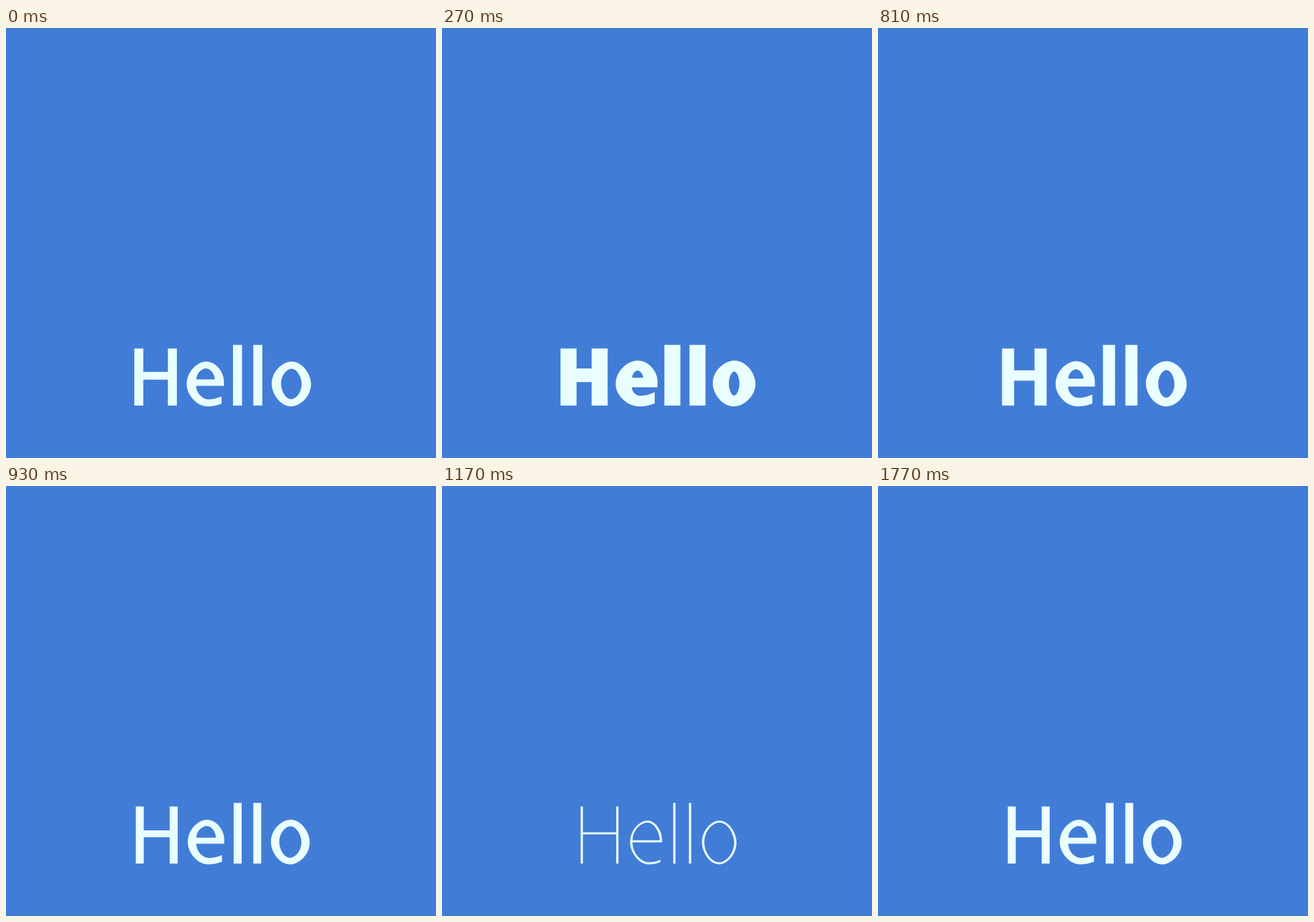
Write an HTML page that moves like this. It is 748x748 px and loops after 1.8 s.

```html
<!DOCTYPE html>
<html lang="en">
<head>
<meta charset="utf-8">
<title>Hello</title>
<style>
  html, body { margin: 0; width: 100%; height: 100%; overflow: hidden; background: #417dd7; }
  svg { display: block; width: 100%; height: 100%; }
  path { fill: #e9ffff; fill-rule: evenodd; }
</style>
</head>
<body>
<svg viewBox="0 0 748 748" role="img" aria-label="Hello"><path id="word"/></svg>
<script>
const LOOP = 1800, TICK = 30, MORPH = 540, HEAVY_AT = 270, THIN_AT = 1170;
const CAP = 557.6, ASCENDER = 551.2, BASE = 656.8, BOTTOM = 658.2;
const MIDDLE = 0.432; // weight of the middle master
const ROUND = 0.6;    // handle length of a quarter curve

// Each value has three masters: thin, middle, heavy
const masters = {
  H: { left: [241.2, 225.5, 206.2], leftIn: [245.2, 239.5, 234.1],
       rightIn: [303, 284.5, 260.3], right: [307, 298.5, 288.2],
       barTop: [602.5, 599, 592.3], barBottom: [606.1, 611.2, 615.9] },
  l1: { left: [402.2, 396, 386.8], right: [406.2, 410, 414.7] },
  l2: { left: [429.5, 430.2, 430.5], right: [433.5, 444.2, 458.4] },
  e: { left: [327.3, 316, 302], right: [382.7, 379.6, 375], top: [582, 580.6, 578.6],
       topX: [357, 349, 340], lowX: [360, 352.5, 344],
       inLeft: [331.4, 331, 330.3], inLow: [654.6, 646.8, 639.8],
       barTop: [616.3, 611.6, 608.6], barBottom: [619.9, 622.3, 625],
       eyeLeft: [331.6, 331.3, 330.8], eyeRight: [378.8, 365, 350], eyeTop: [585.5, 591.6, 596],
       endX: [380, 375.6, 370], endTop: [650.3, 641.8, 633.3], endLow: [653.9, 653.6, 653] },
  o: { left: [452.2, 461, 471], right: [512.3, 528.6, 545.3], top: [582, 580.6, 578.6],
       inLeft: [456.3, 475.7, 499], inRight: [508.2, 513.9, 517.4],
       inTop: [585.5, 592.2, 597.6], inLow: [654.6, 646.6, 639.4] }
};

const lerp = (a, b, t) => a + (b - a) * t;

function glyph(name, weight) {
  const result = {};
  for (const [key, [thin, middle, heavy]] of Object.entries(masters[name])) {
    result[key] = weight < MIDDLE
      ? lerp(thin, middle, weight / MIDDLE)
      : lerp(middle, heavy, (weight - MIDDLE) / (1 - MIDDLE));
  }
  return result;
}

// Quarter curves that leave upright or level and arrive the other way
const fromUpright = (x0, y0, x1, y1) =>
  `C${x0} ${lerp(y0, y1, ROUND)} ${lerp(x1, x0, ROUND < 1 ? 1 - ROUND : 0)} ${y1} ${x1} ${y1}`;
const fromLevel = (x0, y0, x1, y1) =>
  `C${lerp(x0, x1, ROUND)} ${y0} ${x1} ${lerp(y1, y0, 1 - ROUND)} ${x1} ${y1}`;

const box = (left, top, right, bottom) => `M${left} ${top}H${right}V${bottom}H${left}Z`;

function oval(left, top, right, bottom) {
  const x = (left + right) / 2, y = (top + bottom) / 2;
  return `M${left} ${y}` + fromUpright(left, y, x, top) + fromLevel(x, top, right, y) +
    fromUpright(right, y, x, bottom) + fromLevel(x, bottom, left, y) + 'Z';
}

function drawH(g) {
  return `M${g.left} ${CAP}H${g.leftIn}V${g.barTop}H${g.rightIn}V${CAP}H${g.right}V${BASE}` +
    `H${g.rightIn}V${g.barBottom}H${g.leftIn}V${BASE}H${g.left}Z`;
}

function drawE(g) {
  const sideY = 620, shoulderY = 614;
  const lowThird = lerp(g.lowX, g.endX, 0.35), endThird = lerp(g.endX, g.lowX, 0.34);
  return `M${g.left} ${sideY}` + fromUpright(g.left, sideY, g.topX, g.top) +
    fromLevel(g.topX, g.top, g.right, shoulderY) +
    `V${g.barBottom}H${g.inLeft}` + fromUpright(g.inLeft, g.barBottom, g.lowX, g.inLow) +
    `C${lowThird} ${g.inLow} ${endThird} ${lerp(g.endTop, g.inLow, 0.7)} ${g.endX} ${g.endTop}` +
    `V${g.endLow}C${endThird} ${lerp(g.endLow, BOTTOM, 0.7)} ${lowThird} ${BOTTOM} ${g.lowX} ${BOTTOM}` +
    fromLevel(g.lowX, BOTTOM, g.left, sideY) + 'Z' +
    `M${g.eyeLeft} ${g.barTop}` + fromUpright(g.eyeLeft, g.barTop, g.topX, g.eyeTop) +
    fromLevel(g.topX, g.eyeTop, g.eyeRight, g.barTop) + 'Z';
}

function drawWord(weight) {
  const l1 = glyph('l1', weight), l2 = glyph('l2', weight), o = glyph('o', weight);
  return drawH(glyph('H', weight)) + drawE(glyph('e', weight)) +
    box(l1.left, ASCENDER, l1.right, BASE) + box(l2.left, ASCENDER, l2.right, BASE) +
    oval(o.left, o.top, o.right, BOTTOM) + oval(o.inLeft, o.inTop, o.inRight, o.inLow);
}

const ease = p => lerp(p, p * p * (3 - 2 * p), 0.7);

function weightAt(time) {
  const sinceRise = (time - HEAVY_AT + MORPH + LOOP) % LOOP;
  const sinceFall = (time - THIN_AT + MORPH + LOOP) % LOOP;
  return sinceRise < sinceFall
    ? ease(Math.min(1, sinceRise / MORPH))
    : 1 - ease(Math.min(1, sinceFall / MORPH));
}

const word = document.getElementById('word');
const start = performance.now();

function frame() {
  const elapsed = (performance.now() - start) % LOOP;
  word.setAttribute('d', drawWord(weightAt(Math.floor(elapsed / TICK) * TICK)));
  requestAnimationFrame(frame);
}
frame();
</script>
</body>
</html>
```
